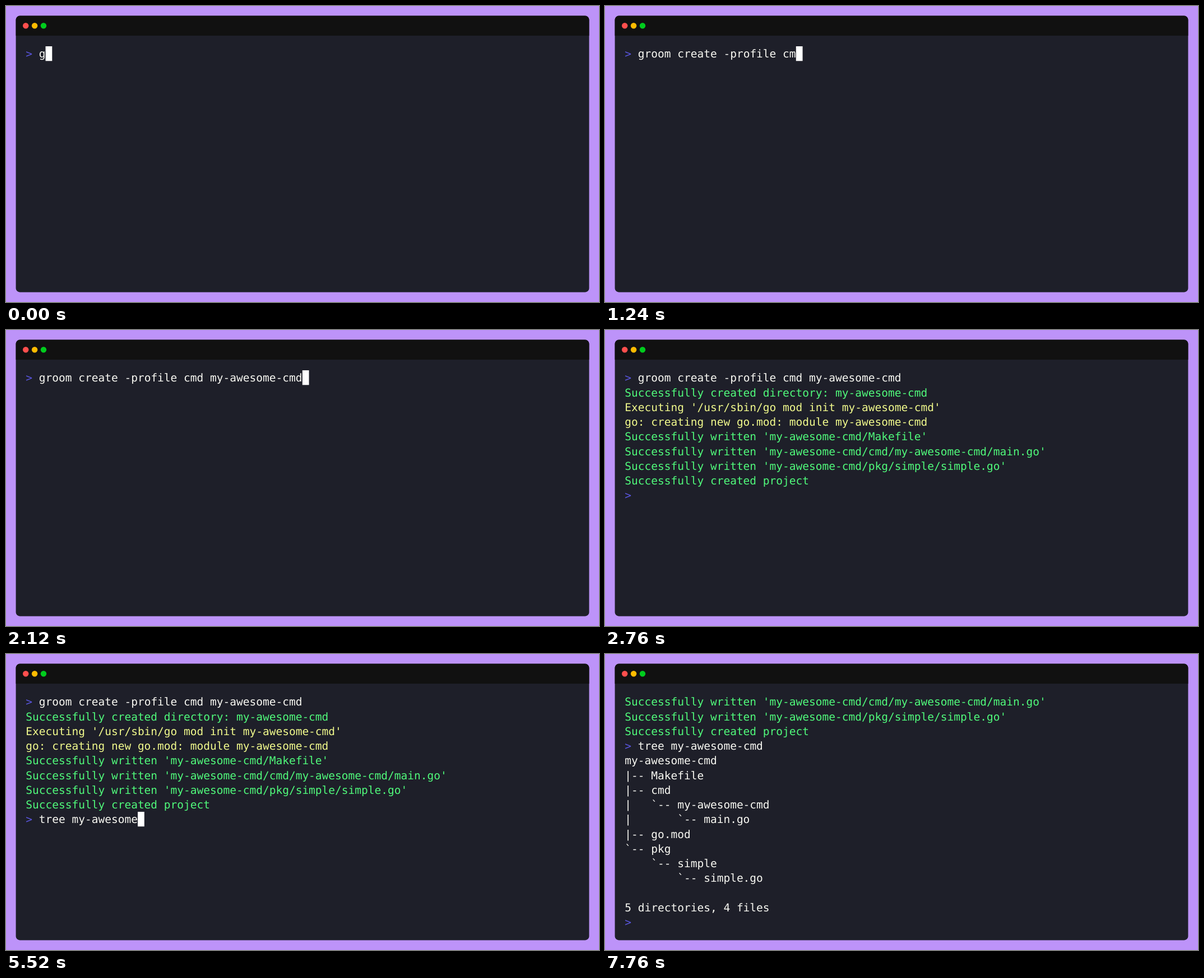
An HTML page for the animation above (8040 ms loop, 1058 by 529 pixels).

```html
<!DOCTYPE html>
<html lang="en">
<head>
<meta charset="utf-8">
<title>Terminal session</title>
<style>
  html, body { margin: 0; width: 100%; height: 100%; overflow: hidden; background: #bd93f9; }
  svg { display: block; width: 1058px; height: 529px; }
  text {
    font: 19.518px "DejaVu Sans Mono", "Noto Sans Mono", monospace;
    font-variant-ligatures: none;
    text-rendering: geometricPrecision;
    white-space: pre;
  }
</style>
</head>
<body>
<svg viewBox="0 0 1058 529">
  <rect x="17.6" y="17.6" width="1022.8" height="493.8" rx="7" fill="#1e1f29"/>
  <path d="M17.6 52.9V24.6a7 7 0 0 1 7-7H1033.4a7 7 0 0 1 7 7V52.9Z" fill="#111"/>
  <circle cx="35.2" cy="35.3" r="5.2" fill="#ff4f4d"/>
  <circle cx="51.1" cy="35.3" r="5.2" fill="#febb00"/>
  <circle cx="67" cy="35.3" r="5.2" fill="#00cc1d"/>
  <g id="screen"></g>
  <rect id="cursor" width="11.75" height="26.25" fill="#fff"/>
</svg>
<script>
const LOOP = 8040, ROWS = 16;
const LEFT = 35.3, TOP = 72, CELL = 11.75, LINE = 26.25, BASE = 20.3;
const WHITE = '#f8f8f2', GREEN = '#50fa7b', YELLOW = '#f1fa8c', BLUE = '#5a56e0';

const NAME = 'my-awesome-cmd';
const CREATE = `groom create -profile cmd ${NAME}`;
const TREE = `tree ${NAME}`;
const paint = (color, ...lines) => lines.map(text => ({ text, color }));
const prompt = (command = '') => ({ text: command, color: WHITE, prompt: true });

const created = [
  ...paint(GREEN, `Successfully created directory: ${NAME}`),
  ...paint(YELLOW, `Executing '/usr/sbin/go mod init ${NAME}'`,
    `go: creating new go.mod: module ${NAME}`),
  ...paint(GREEN, `Successfully written '${NAME}/Makefile'`,
    `Successfully written '${NAME}/cmd/${NAME}/main.go'`,
    `Successfully written '${NAME}/pkg/simple/simple.go'`,
    'Successfully created project'),
];
const listing = paint(WHITE, NAME,
  '|-- Makefile',
  '|-- cmd',
  `|   \`-- ${NAME}`,
  '|       `-- main.go',
  '|-- go.mod',
  '`-- pkg',
  '    `-- simple',
  '        `-- simple.go',
  '',
  '5 directories, 4 files');

// Key presses land on a 40 ms clock.
const createKey = i => i === 33 ? 1800 : 160 * Math.floor(i / 3) + [0, 80, 120][i % 3];
const treeKey = i => 4120 + 200 * Math.floor(i / 2) + 120 * (i % 2);

function typed(command, keyTime, t) {
  let n = 0;
  while (n < command.length && keyTime(n) <= t) n++;
  return command.slice(0, n);
}

function linesAt(t) {
  if (t < 2160) return [prompt(typed(CREATE, createKey, t))];
  const first = prompt(CREATE);
  if (t < 2200) return [first, ...paint(WHITE, '')];
  if (t < 6040) return [first, ...created, prompt(typed(TREE, treeKey, t))];
  return [first, ...created, prompt(TREE), ...listing, prompt()].slice(-ROWS);
}

const within = (t, a, b) => t >= a && t < b;
const cursorHidden = t =>
  within(t, 2760, 3320) || within(t, 3920, 4120) || within(t, 6600, 7200) || t >= 7760;

const screen = document.getElementById('screen');
const cursor = document.getElementById('cursor');

function addText(text, col, row, color) {
  const el = document.createElementNS('http://www.w3.org/2000/svg', 'text');
  el.setAttribute('x', LEFT + col * CELL);
  el.setAttribute('y', TOP + row * LINE + BASE);
  el.setAttribute('fill', color);
  el.textContent = text;
  screen.append(el);
}

let shown = '';
function draw(t) {
  const lines = linesAt(t);
  const key = JSON.stringify(lines);
  if (key !== shown) {
    shown = key;
    screen.replaceChildren();
    lines.forEach((line, row) => {
      if (line.prompt) addText('>', 0, row, BLUE);
      if (line.text) addText(line.text, line.prompt ? 2 : 0, row, line.color);
    });
  }
  const last = lines[lines.length - 1];
  cursor.setAttribute('x', LEFT + (last.text.length + (last.prompt ? 2 : 0)) * CELL);
  cursor.setAttribute('y', TOP + (lines.length - 1) * LINE);
  cursor.setAttribute('visibility', cursorHidden(t) ? 'hidden' : 'visible');
}

const start = performance.now();
function tick() {
  draw((performance.now() - start) % LOOP);
  requestAnimationFrame(tick);
}
tick();
</script>
</body>
</html>
```
